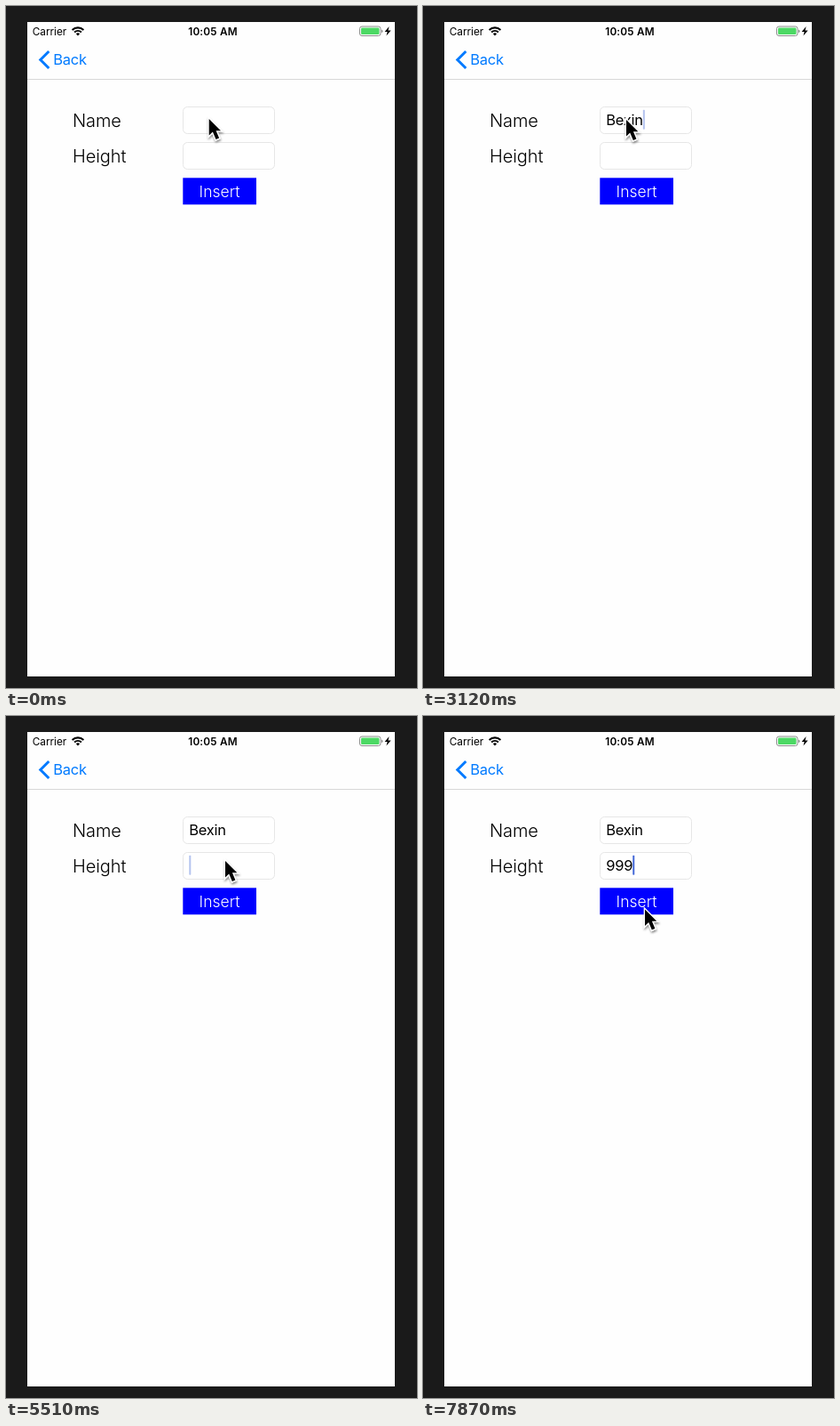
Write an HTML page that moves like this. It is 463 px wide and 767 px high and loops after 8000 ms.

```html
<!DOCTYPE html>
<html lang="en">
<head>
<meta charset="utf-8">
<title>Insert form</title>
<style>
  html, body { margin: 0; width: 100%; height: 100%; overflow: hidden; background: #1a1a1a; }
  svg { display: block; width: 100%; height: 100%; font-family: Inter, "Open Sans", sans-serif; }
  .label { font-size: 20px; font-weight: 300; letter-spacing: -.1px; }
  .body { font-size: 16.5px; letter-spacing: -.25px; }
  .status { font-size: 11.8px; }
  .field { fill: #fff; stroke: #e6e6e6; }
  .blue { fill: #007aff; }
</style>
</head>
<body>
<svg viewBox="0 0 463 767">
  <defs>
    <filter id="shadow" x="-50%" y="-50%" width="220%" height="220%">
      <feDropShadow dx="0.5" dy="2" stdDeviation="1.3" flood-opacity=".45"/>
    </filter>
  </defs>
  <rect width="463" height="767" fill="#1a1a1a"/>
  <rect x="24" y="18" width="414" height="736" fill="#fefefe"/>
  <rect x="24" y="82" width="414" height="1" fill="#d8d8d8"/>

  <text class="status" x="29.7" y="32.7">Carrier</text>
  <g fill="none" stroke="#000" stroke-width="2.1">
    <path d="M74.6 26.9a9.3 9.3 0 0 1 12.8 0"/>
    <path d="M77.1 29.5a5.7 5.7 0 0 1 7.8 0"/>
  </g>
  <path d="M81 33.4l-2.1-2.2a3 3 0 0 1 4.2 0z"/>
  <text class="status" x="233" y="32.7" text-anchor="middle" font-weight="600" letter-spacing=".2">10:05 AM</text>
  <rect x="398.5" y="23" width="23.5" height="10.5" rx="2.5" fill="#fff" stroke="#8c8c8c"/>
  <rect x="400" y="24.5" width="20.5" height="7.5" rx="1.2" fill="#4cd964"/>
  <path d="M423 26.4q1.4.4 1.4 1.8t-1.4 1.8z" fill="#8c8c8c"/>
  <path d="M431.6 23l-5 5.9h3l-1.1 4.6 5.1-6.1h-3.1z"/>

  <path d="M48.3 51L38.8 60.5 48.3 70" fill="none" stroke="#007aff" stroke-width="3"/>
  <text class="body blue" x="53.2" y="66">Back</text>

  <text class="label" x="75" y="135.5">Name</text>
  <text class="label" x="75" y="175.5">Height</text>
  <rect class="field" x="199.5" y="113.5" width="103" height="30" rx="5"/>
  <rect class="field" x="199.5" y="153.5" width="103" height="30" rx="5"/>
  <rect x="199.3" y="193.3" width="82.7" height="30" fill="#00f"/>
  <text x="240.5" y="214.5" text-anchor="middle" fill="#fff" font-size="17.5" font-weight="300">Insert</text>

  <rect id="mark" x="203" y="115" height="24" fill="#cadef0"/>
  <text id="name" class="body" x="206.2" y="134"></text>
  <text id="height" class="body" x="206.2" y="174"></text>
  <g id="hint">
    <path d="M203.5 139.5H241.5a13 13 0 0 1 0 26H203.5z" fill="#fff" stroke="#b4b4b4"/>
    <text class="body blue" x="206.2" y="158.3">Fav</text>
    <path d="M237 149.5l7 7m0-7l-7 7" stroke="#a8a8a8" stroke-width="1.3"/>
  </g>
  <rect id="caret" width="2" height="22" rx=".8" fill="#4468d8"/>
  <g id="pointer">
    <path d="M0 0V18.6L4.2 14.6 7.8 23 11.4 21.5 7.9 13.3H13.3Z" stroke="#fff" stroke-width="2.6"
      paint-order="stroke" filter="url(#shadow)"/>
  </g>
</svg>
<script>
const LOOP = 8000;
const $ = id => document.getElementById(id);
const [mark, nameText, heightText, hint, caret, pointer] =
  ["mark", "name", "height", "hint", "caret", "pointer"].map($);

// Each track is a list of [start time, value] steps.
const typedName = [[0, ""], [1350, "Be"], [1950, "Bex"], [2240, "Bexi"], [2380, "Bexin"]];
const typedHeight = [[0, ""], [7140, "9"], [7280, "99"], [7430, "999"]];
const suggestion = [[0, false], [2100, true], [2380, false]];
const blink = [
  [0, 0], [300, 1], [750, .4], [900, 0], [1350, 1],
  [2980, .4], [3130, 0], [3570, 1],
  [4460, .4], [4610, 0], [5060, 1],
  [5510, .4], [5660, 0], [5950, .5], [6100, 1],
  [6550, .4], [6700, 0], [6990, .85], [7140, 1]
];
const mouse = [
  [0, [228.7, 127]], [2980, [229, 128]], [3130, [232, 134]], [3280, [240, 149]],
  [3420, [246, 160]], [3570, [248, 163]], [5510, [247, 163]], [5660, [246, 163]],
  [7580, [246.5, 174]], [7730, [249, 205]], [7870, [250, 217.5]]
];

const at = (track, t) => track.reduce((now, [start, value]) => t >= start ? value : now, track[0][1]);
const show = (el, on) => el.setAttribute("visibility", on ? "visible" : "hidden");

function setText(el, text) {
  if (el.textContent !== text) el.textContent = text;
  return text ? el.getComputedTextLength() : 0;
}

function draw(t) {
  const nameWidth = setText(nameText, at(typedName, t));
  const heightWidth = setText(heightText, at(typedHeight, t));
  const inHeight = t >= 4020;
  const caretX = 206.3 + (inHeight ? heightWidth : nameWidth);
  caret.setAttribute("x", caretX);
  caret.setAttribute("y", inHeight ? 156.7 : 116.7);
  caret.setAttribute("opacity", at(blink, t));

  const suggesting = at(suggestion, t);
  show(hint, suggesting);
  show(mark, suggesting);
  mark.setAttribute("width", nameWidth + 3.5);

  pointer.setAttribute("transform", `translate(${at(mouse, t)})`);
}

const begin = performance.now();
function frame() {
  draw((performance.now() - begin) % LOOP);
  requestAnimationFrame(frame);
}
frame();
</script>
</body>
</html>
```
